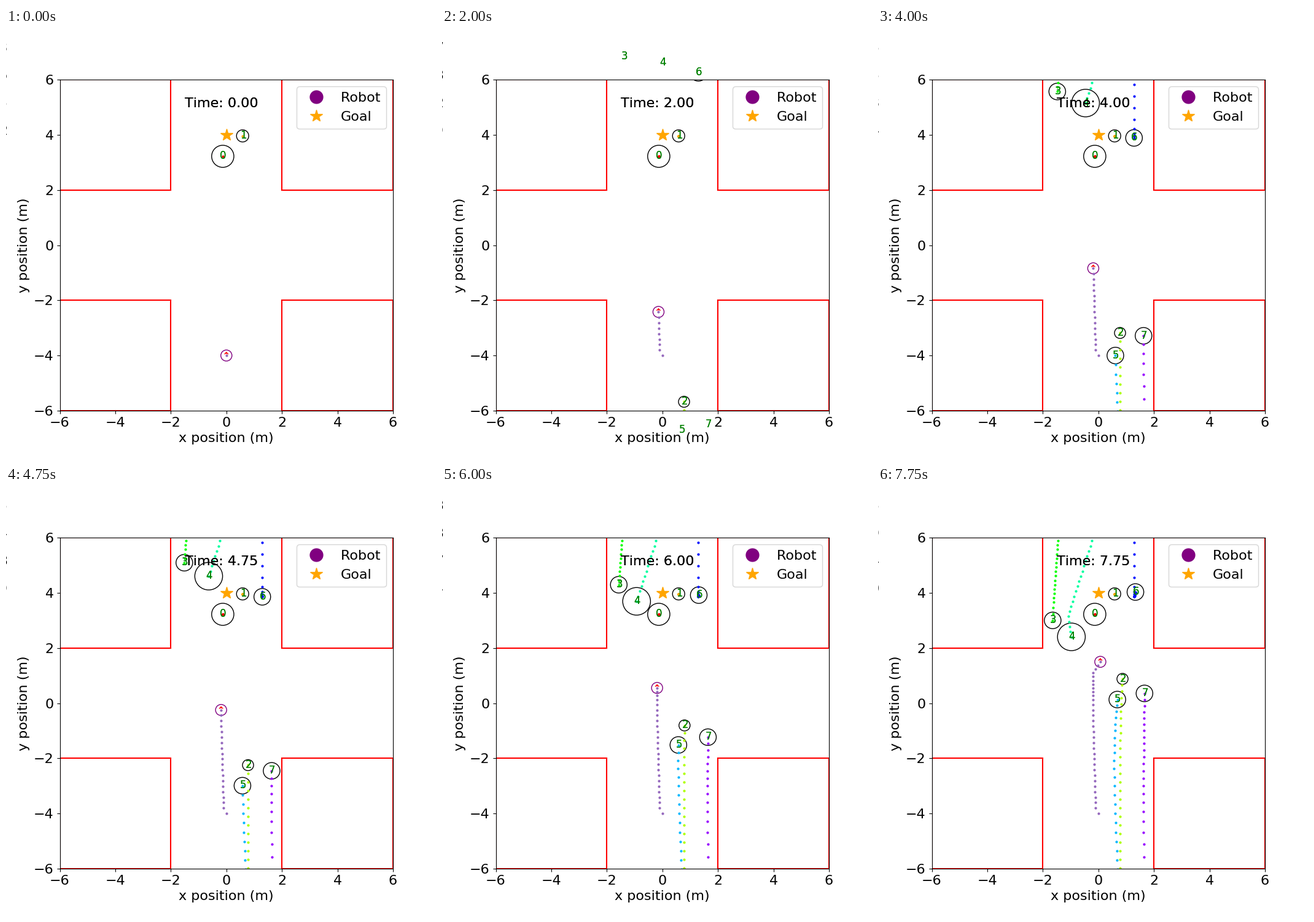
A matplotlib script for the animation above (8 s loop, 700 by 700 pixels).

```python
import numpy as np
import matplotlib.pyplot as plt
from matplotlib.animation import FuncAnimation
from matplotlib.lines import Line2D
from matplotlib.patches import ArrowStyle, Circle, FancyArrowPatch

STEP = 0.25
FRAMES = 32
FONT = 16
TIMES = np.arange(FRAMES) * STEP
plt.rcParams["font.family"] = "DejaVu Sans"
plt.rcParams["text.kerning_factor"] = 6


def walk(start, v0=(0, 0), v1=(0, 0), turn=0, rate=1):
    """Steady walk at v0; from time `turn` the velocity relaxes to v1."""
    start, v0, v1 = map(np.array, (start, v0, v1))
    before = np.minimum(TIMES, turn)[:, None]
    after = np.maximum(TIMES - turn, 0)[:, None]
    ease = (1 - np.exp(-rate * after)) / rate
    return start + v0 * before + v1 * after + (v0 - v1) * ease


# Radius and walk of each person.
HUMANS = [
    (.4, walk((-.13, 3.22))),
    (.22, walk((.585, 3.96))),
    (.2, walk((.78, -8.17), (0, 1.247), (.12, .42), 4.75, .2)),
    (.3, walk((-1.3, 8.12), (-.045, -.638), (-.04, -.92), 7, 8)),
    (.5, walk((.47, 8.07), (-.233, -.73), (.13, -.74), 6.5, 4)),
    (.3, walk((.8, -9.42), (-.047, 1.355), (.24, .25), 4.5, .2)),
    (.3, walk((1.33, 9.625), (-.016, -1.69), (.014, .065), 3, 2.1)),
    (.3, walk((1.69, -10.2), (-.02, 1.85), (.012, .88), 2.75, .9)),
]

# The robot heads up, slows in the crossing and swerves by a few key points.
robot_path = walk((0, -4), (0, .79), (0, .54), 5, 4)
robot_path[:, 0] = np.interp(TIMES, [0, .25, 4.25, 7, 7.75],
                             [0, -.1, -.19, -.19, .07])

fig, ax = plt.subplots(figsize=(7, 7), dpi=100)
ax.set_xlim(-6, 6)
ax.set_ylim(-6, 6)
ax.set_xticks(range(-6, 7, 2))
ax.set_yticks(range(-6, 7, 2))
ax.tick_params(labelsize=FONT)
ax.set_xlabel("x position (m)", fontsize=FONT)
ax.set_ylabel("y position (m)", fontsize=FONT)

corner = np.array([(2, 2), (6, 2), (6, 6), (2, 6), (2, 2)])
for sx in (-1, 1):
    for sy in (-1, 1):
        ax.plot(*(corner * (sx, sy)).T, color="red", lw=1.5)

goal, = ax.plot([0], [4], color="orange", marker="*", ls="None",
                markersize=15, label="Goal")
robot_key = Line2D([], [], color="purple", marker="o", ls="None",
                   markersize=15, label="Robot")
ax.legend(handles=[robot_key, goal], fontsize=FONT, loc="upper right")


def heavy_text(x, y, text="", **style):
    """The same text printed twice, for darker edges."""
    return [ax.text(x, y, text, **style) for _ in range(2)]


class Agent:
    def __init__(self, path, radius, edge, dot, name=""):
        self.path = path
        self.ring = ax.add_patch(Circle(path[0], radius, fill=False,
                                        edgecolor=edge, lw=1))
        self.trail, = ax.plot([], [], color=dot, marker=".", ls="None",
                              markersize=4)
        self.labels = heavy_text(0, 0, name, color="green", fontsize=12)

    def move(self, i):
        pos = self.path[i]
        self.ring.center = pos
        self.trail.set_data(*self.path[:i + 1].T)
        for label in self.labels:
            label.set_position(pos - 0.1)


hues = plt.get_cmap("hsv", 10)
robot = Agent(robot_path, .2, "purple", "tab:purple")
agents = [robot] + [Agent(path, radius, "black", hues(k), str(k))
                    for k, (radius, path) in enumerate(HUMANS)]
arrow = ax.add_patch(FancyArrowPatch(
    (0, 0), (0, 1), color="red", lw=1,
    arrowstyle=ArrowStyle("->", head_length=2, head_width=2)))

clocks = heavy_text(-1.5, 5, fontsize=FONT)
# Readouts off the left edge: only the rim of their last digit shows.
scores = [ax.text(-7.89, y, "", fontsize=FONT, ha="right")
          for y in (7, 6, 5, 4)]


def update(i):
    for agent in agents:
        agent.move(i)
    x, y = robot.path[i]
    arrow.set_positions((x, y), (x, y + .2))
    for clock in clocks:
        clock.set_text(f"Time: {TIMES[i]:.2f}")
    digits = np.random.default_rng(i).integers(0, 10, len(scores))
    for score, digit in zip(scores, digits):
        score.set_text(str(digit))
    return []


anim = FuncAnimation(fig, update, frames=FRAMES, interval=250,
                     repeat=True, repeat_delay=0, blit=False)
plt.show()
```
